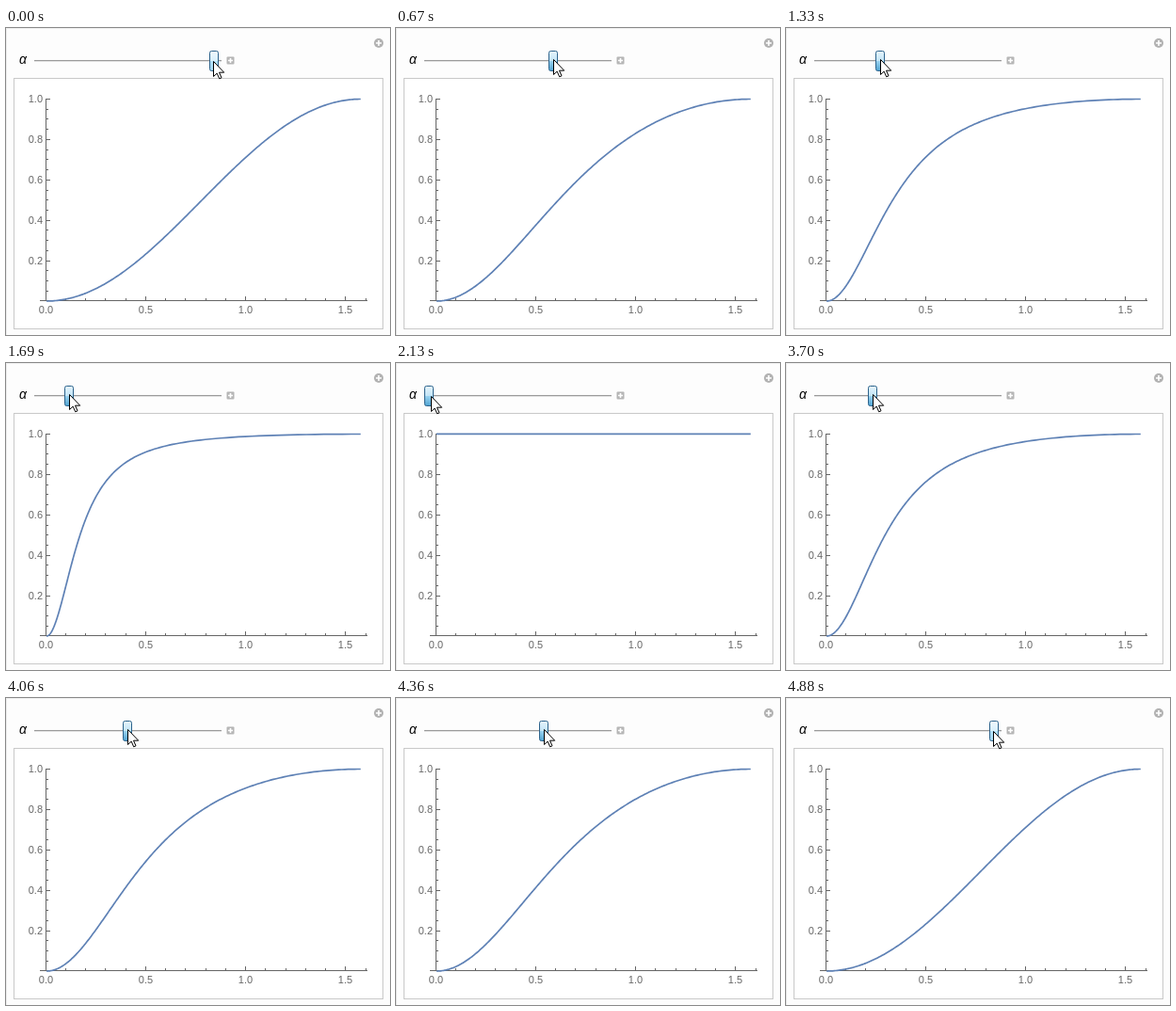
Write an HTML page that moves like this. It is 408 by 326 pixels and loops after 5.17 s.

```html
<!DOCTYPE html>
<html lang="en">
<head>
<meta charset="utf-8">
<title>Slider and curve</title>
<style>
  html, body { margin: 0; width: 100%; height: 100%; overflow: hidden; background: #fdfdfd; }
  svg { display: block; width: 408px; height: 326px; }
  text { font: 11px "Liberation Sans", Arial, sans-serif; fill: #666; }
  .alpha { font-size: 14px; font-style: italic; fill: #000; }
  .axis { fill: none; stroke: #666; shape-rendering: crispEdges; }
  .plus { fill: none; stroke: #fff; stroke-width: 1.6; }
</style>
</head>
<body>
<svg viewBox="0 0 408 326">
  <defs>
    <linearGradient id="pressed" x2="0" y2="1">
      <stop offset="0" stop-color="#e5f4fc"/>
      <stop offset=".48" stop-color="#c4e5f6"/>
      <stop offset=".52" stop-color="#98d1ef"/>
      <stop offset="1" stop-color="#4fa3d1"/>
    </linearGradient>
    <linearGradient id="hot" x2="0" y2="1">
      <stop offset="0" stop-color="#f0f9fe"/>
      <stop offset=".48" stop-color="#d9f0fc"/>
      <stop offset=".52" stop-color="#b4e2f9"/>
      <stop offset="1" stop-color="#a0d7f3"/>
    </linearGradient>
  </defs>
  <path d="M0 .5H408M.5 0V326" stroke="#ececec"/>
  <circle cx="396" cy="16" r="5" fill="#b2b2b2"/>
  <path class="plus" d="M393 16h6M396 13v6"/>
  <text class="alpha" x="14" y="38">α</text>
  <path d="M30 34.5H229" stroke="#9c9c9c"/>
  <path d="M30 35.5H229" stroke="#dedede"/>
  <rect x="234.5" y="30.5" width="8" height="8" rx="1" fill="#b6b6b6"/>
  <path class="plus" d="M236 34.5h5M238.5 32v5"/>
  <rect x="8.5" y="53.5" width="392" height="266" fill="#fff" stroke="#c9c9c9"/>
  <path id="axes" class="axis"/>
  <g id="labels"></g>
  <path id="curve" fill="none" stroke="#5e81b5" stroke-width="1.7" stroke-linejoin="round"/>
  <rect id="thumb" x="-4.5" y="24.5" width="9" height="21" rx="2" stroke="#2c628b"/>
  <path id="cursor" d="M0 0V16L3.7 12.6L6.2 18.3L8.5 17.3L6 11.7H11.2Z" fill="#fff" stroke="#000"/>
</svg>
<script>
const $ = id => document.getElementById(id);
const LOOP = 5170, STEPS = 26, TRAVEL = 189, LEFT = 35;
const px = x => 43 + 212.5 * x;
const py = y => 290 - 214.5 * y;

// Runs of slider moves: first time, last time, number of moves
const runs = [
  [290, 810, 8], [890, 1410, 8], [1470, 1990, 8], [2070, 2130, 2],
  [2440, 2440, 1], [2730, 2730, 1],
  [3040, 3540, 8], [3620, 4140, 8], [4220, 4730, 8], [4790, 4880, 2]
];
const times = runs.flatMap(([from, to, count]) =>
  Array.from({ length: count }, (_, i) =>
    Math.floor((from + (to - from) * i / Math.max(1, count - 1)) / 10) * 10));

// Slider offset in pixels by number of moves away from zero
const drag = [[0, 0], [2, 7], [10, 57], [11, 65], [19, 122], [20, 132], [26, 186]];

function offsetAt(n) {
  const i = Math.max(1, drag.findIndex(([k]) => k >= n));
  const [a, p] = drag[i - 1], [b, q] = drag[i];
  return Math.round(p + (q - p) * (n - a) / (b - a));
}

function drawAxes() {
  let d = "M36 289.5H384M42.5 75V290";
  let labels = "";
  for (let i = 0; i <= 16; i++) {
    const x = Math.floor(px(i / 10)) - .5, major = i % 5 === 0;
    d += `M${x} 290v${major ? -5 : -3}`;
    if (major) labels += `<text x="${x}" y="302.5" text-anchor="middle">${(i / 10).toFixed(1)}</text>`;
  }
  for (let i = 1; i <= 20; i++) {
    const y = Math.floor(py(i / 20)) + .5, major = i % 4 === 0;
    d += `M42 ${y}h${major ? 5 : 3}`;
    if (major) labels += `<text x="39" y="${y + 3.5}" text-anchor="end">${(i / 20).toFixed(1)}</text>`;
  }
  $("axes").setAttribute("d", d);
  $("labels").innerHTML = labels;
}

// y = sin²x / (sin²x + α² cos²x), traced through tan x = α tan s
function curvePath(alpha) {
  if (!alpha) return `M43 75.3H${px(Math.PI / 2)}`;
  const points = [];
  for (let i = 0; i <= 200; i++) {
    const s = i / 200 * Math.PI / 2;
    const x = i < 200 ? Math.atan(alpha * Math.tan(s)) : s;
    points.push(px(x).toFixed(2) + " " + py(Math.sin(s) ** 2).toFixed(2));
  }
  return "M" + points.join("L");
}

function pose(k) {
  const n = k <= STEPS ? STEPS - k : Math.max(0, k - STEPS - 2);
  const offset = offsetAt(n), x = LEFT + offset;
  const resting = k === STEPS + 1;
  const atEnd = n === 0 || n === STEPS;
  const slip = n === 0 ? (resting ? 1 : 2) : n === STEPS ? -1 : 0;
  $("curve").setAttribute("d", curvePath(offset / TRAVEL));
  $("thumb").setAttribute("transform", `translate(${x})`);
  $("thumb").setAttribute("fill", `url(#${n === STEPS || resting ? "hot" : "pressed"})`);
  $("cursor").setAttribute("transform", `translate(${x + slip + .5} ${atEnd ? 35.5 : 33.5})`);
}

let shown = -1;
function tick() {
  const t = performance.now() % LOOP;
  const k = times.filter(time => time <= t).length;
  if (k !== shown) pose(shown = k);
  requestAnimationFrame(tick);
}

drawAxes();
tick();
</script>
</body>
</html>
```
